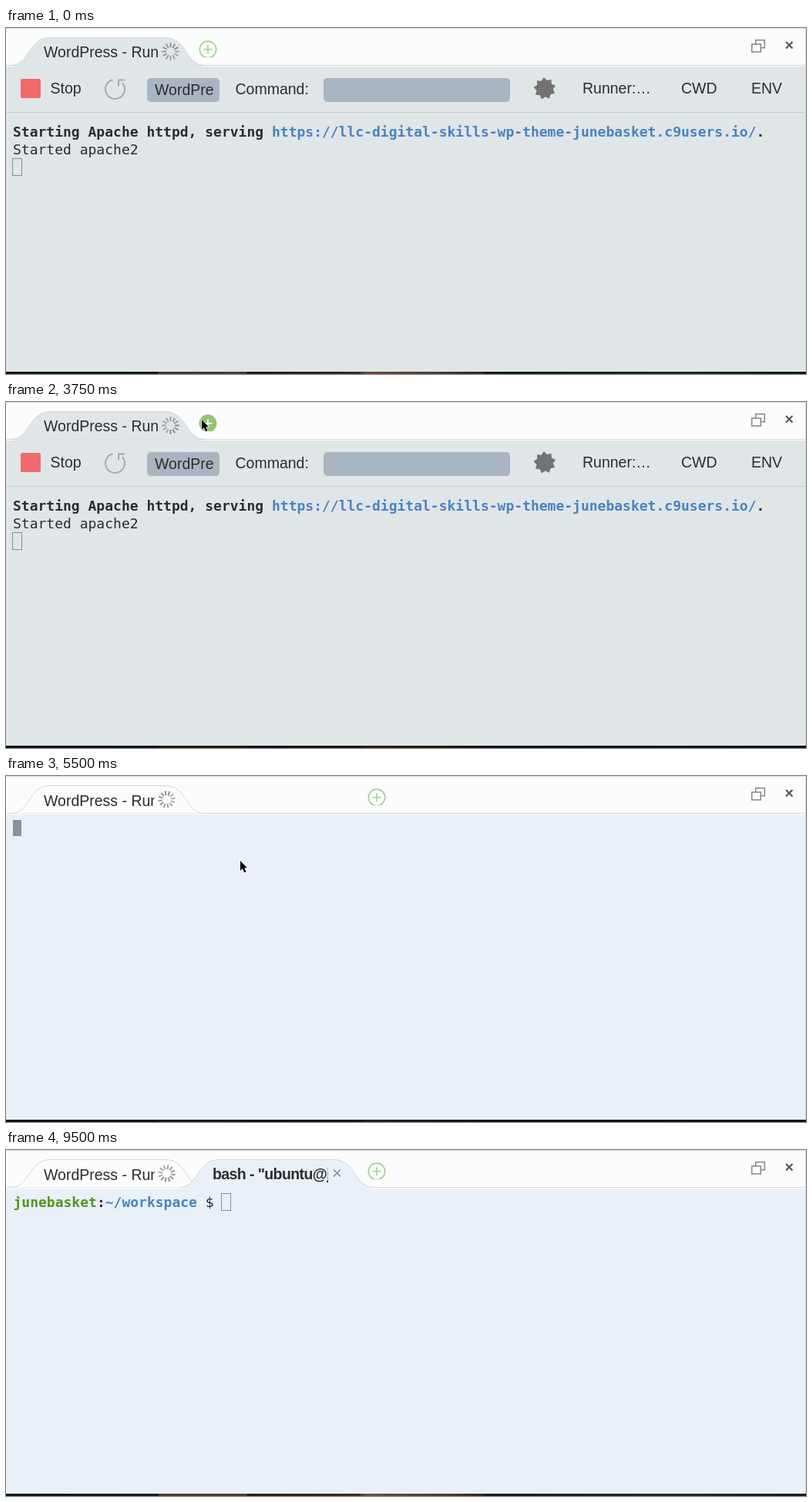
Animation, 1038 px wide and 449 px high, one loop 9750 ms. Source, as an HTML page:

```html
<!DOCTYPE html>
<html lang="en">
<head>
<meta charset="utf-8">
<title>Opening a terminal</title>
<style>
html, body { margin: 0; width: 100%; height: 100%; overflow: hidden; background: #fcfcfc; }
svg { display: block; }
text { font: 19.5px "Liberation Sans", Arial, sans-serif; fill: #2c2c2c; white-space: pre; }
.bold { font-weight: bold; letter-spacing: -.6px; }
.mono text { font: 18px "DejaVu Sans Mono", monospace; }
.mono .b { font-weight: bold; }
#menu text { font-size: 18px; }
#menu .on, #menu .on text { fill: #fff; }
#menu .on path { stroke: #fff; }
.line { fill: none; stroke: #2c2c2c; stroke-width: 1.5; }
.tab { stroke: #d3d6d8; }
</style>
</head>
<body>
<svg width="1038" height="449" viewBox="0 0 1038 449">
  <defs>
    <path id="tab" d="M6 48.5C32 48 28 12.5 58 12.5H206C236 12.5 232 48 258 48.5"/>
    <clipPath id="clipTitle"><rect id="titleBox" width="198" height="48"/></clipPath>
    <clipPath id="clipBash"><rect width="418" height="48"/></clipPath>
    <clipPath id="clipName"><rect x="183" y="65" width="86.5" height="31"/></clipPath>
    <clipPath id="clipPlus"><rect x="-14" y="-14" width="28" height="24.3"/></clipPath>
    <linearGradient id="desk">
      <stop offset="0" stop-color="#10161b"/><stop offset=".19" stop-color="#121a1f"/>
      <stop offset=".191" stop-color="#4d3a2e"/><stop offset=".3" stop-color="#503a2c"/>
      <stop offset=".302" stop-color="#251c19"/><stop offset=".44" stop-color="#3a2a22"/>
      <stop offset=".45" stop-color="#6a4d37"/><stop offset=".55" stop-color="#4c382b"/>
      <stop offset=".597" stop-color="#30251f"/><stop offset=".598" stop-color="#10191d"/>
      <stop offset=".84" stop-color="#1d2b2c"/><stop offset="1" stop-color="#11181c"/>
    </linearGradient>
    <filter id="shadow" x="-5%" y="-5%" width="110%" height="112%">
      <feDropShadow dx="0" dy="2" stdDeviation="3" flood-opacity=".25"/>
    </filter>
  </defs>

  <rect width="1038" height="449" fill="#fcfcfc"/>
  <path d="M0 .5H1038" stroke="#dadada"/>
  <rect id="page" y="50" width="1038" height="396"/>
  <path d="M0 48.5H1038" stroke="#d3d6d8"/>
  <path d="M0 49.5H1038" stroke="#fff"/>

  <use id="tab1" href="#tab" class="tab"/>
  <path id="join" d="M10 48.5H254V50H10Z" fill="#e0e5e8"/>
  <g clip-path="url(#clipTitle)"><text id="title" x="49">WordPress - Run</text></g>
  <g id="spin" stroke="#808386" stroke-width="1.8"></g>

  <g id="tab2">
    <use href="#tab" x="219" class="tab" fill="#e9f0f8"/>
    <path d="M229 48H473V50H229Z" fill="#e9f0f8"/>
    <g clip-path="url(#clipBash)"><text x="268" y="38" class="bold">bash - "ubuntu@junebasket</text></g>
    <path d="M425 25.5l9 9m0-9l-9 9" stroke="#858a8f" stroke-width="1.6"/>
  </g>

  <g id="plus" stroke="#a0cf8c" stroke-width="1.6">
    <circle id="disc" r="10.7" clip-path="url(#clipPlus)"/>
    <path d="M-5.5 0H5.5M0-5.5V5.5"/>
  </g>

  <g fill="#fcfcfc" stroke="#858585" stroke-width="1.5">
    <rect x="972.7" y="15.7" width="11.6" height="10"/>
    <rect x="967.7" y="21" width="11.6" height="10"/>
    <path d="M1012 18l8.5 8.5m0-8.5l-8.5 8.5" stroke="#555" stroke-width="2.1"/>
  </g>

  <g id="runner">
    <path d="M0 109.5H1038" stroke="#c6ccd0"/>
    <rect x="19" y="66" width="26" height="25" rx="2" fill="#f16a6b"/>
    <path d="M138.500 67.300A12.500 12.500 0 1 0 151 71.300M154 67.500H146V75.500" fill="none" stroke="#a6abaf" stroke-width="2"/>
    <g fill="#a9b5c1">
      <rect x="183" y="65" width="94" height="31" rx="5"/>
      <rect x="412" y="65" width="242" height="31" rx="5"/>
    </g>
    <path id="gear" fill="#737373"/>
    <text x="57.500" y="85">Stop</text>
    <g clip-path="url(#clipName)"><text x="193" y="87">WordPress</text></g>
    <text x="297.500" y="86">Command:</text>
    <text x="748" y="85">Runner:…</text>
    <text x="876" y="85">CWD</text>
    <text x="967" y="85">ENV</text>
    <g class="mono">
      <text x="9" y="141" class="b">Starting Apache httpd, serving <tspan fill="#4a83bd">https://llc-digital-skills-wp-theme-junebasket.c9users.io/</tspan>.</text>
      <text x="9" y="164">Started apache2</text>
    </g>
    <rect x="8.500" y="169.500" width="12" height="22" fill="none" stroke="#8b8e90"/>
  </g>

  <g id="prompt" class="mono">
    <text x="9.500" y="74"><tspan class="b" fill="#54961a">junebasket</tspan><tspan class="b">:</tspan><tspan class="b" fill="#4a83bd">~/workspace</tspan> $</text>
  </g>
  <rect id="caret"/>

  <g id="menu">
    <path d="M247 43H970Q975 43 975 48V331Q975 336 970 336H252Q247 336 247 331Z" fill="#fdfdfd" filter="url(#shadow)"/>
    <rect id="bar" x="247" width="728" height="31" fill="#63a9ff"/>
    <g class="row">
      <text x="286" y="76">New File</text><text x="928.500" y="76">N</text>
      <path class="line" d="M911 70l5-7l5 7"/>
    </g>
    <g class="row">
      <text x="286" y="108">New Terminal</text><text x="930.500" y="108">T</text>
      <path class="line" d="M908 96h5l6.500 11h5.500M917 96h8"/>
    </g>
    <g class="row"><text x="286" y="139">New Run Configuration</text></g>
    <g class="row">
      <text x="286" y="171">Open Preferences</text><text x="936" y="171">,</text>
      <text x="914" y="171" style="font-family:'DejaVu Sans',sans-serif;font-size:17px">⌘</text>
    </g>
    <g class="row"><text x="286" y="202">New Immediate Window</text></g>
    <path d="M260 220.500H959" stroke="#e6e6e6"/>
    <text x="286" y="254" style="fill:#999">Recently Closed Tabs</text>
    <text x="299" y="285">Immediate (Javascript (browser))</text>
    <text x="299" y="317">bash - "ubuntu@junebasket-llc-digital-skills-wp-theme-4267004: ~/workspace"</text>
  </g>

  <path d="M1037.500 0V446" stroke="#d5d8da"/>
  <rect y="446" width="1038" height="3" fill="url(#desk)"/>
  <rect id="dim" y="446" width="1038" height="3" fill="#080808" opacity=".65"/>
  <path id="mouse" d="M0 0V12.800L3 10.200L5.200 15.300L7.500 14.300L5.300 9.300H9Z" stroke="#fff" stroke-width="1.200" paint-order="stroke"/>
</svg>
<script>
const $ = id => document.getElementById(id);
const set = (id, attrs) => { for (const a in attrs) $(id).setAttribute(a, attrs[a]); };
const show = (id, on) => set(id, { visibility: on ? 'visible' : 'hidden' });
const STEP = 250, LOOP = 9750;
const MENU = 17, TERM = 22, TAB = 23, PROMPT = 26, BLUR = 37;

// Pointer stops: step, x, y
const stops = [[4, 65, 97], [5, 65, 97], [7, 114, 97], [8, 150, 141], [10, 254, 45], [11, 254, 23],
  [17, 254, 23], [20, 300, 106], [21, 304, 110], [32, 304, 110], [35, 322, 104], [36, 420, 230]];

function pointer(k) {
  const i = stops.findIndex(s => s[0] >= k);
  if (i < 0 || k < stops[0][0]) return null;
  const b = stops[i], a = stops[Math.max(0, i - 1)];
  const f = i ? (k - a[0]) / (b[0] - a[0]) : 1;
  return [a[1] + (b[1] - a[1]) * f, a[2] + (b[2] - a[2]) * f];
}

const polar = (r, a) => `${(r * Math.cos(a)).toFixed(2)} ${(r * Math.sin(a)).toFixed(2)}`;
for (let i = 0; i < 12; i++) {
  const a = i * Math.PI / 6;
  $('spin').innerHTML += `<path d="M${polar(5.5, a)}L${polar(11.3, a)}" opacity="${0.65 + i * 0.03}"/>`;
}
const teeth = Array.from({ length: 18 }, (_, i) => polar(i % 2 ? 10.8 : 14.5, i * Math.PI / 9 - 0.25));
set('gear', { d: `M${teeth.join('L')}Z`, transform: 'translate(699 78.5)' });

const rows = document.querySelectorAll('.row');

function draw(k) {
  const term = k >= TERM, menu = k >= MENU && !term, hover = k >= 11 && !term;
  const pos = pointer(k);

  set('page', { fill: term ? '#e9f0f8' : '#e0e5e8' });
  set('tab1', { fill: term ? '#fcfcfc' : '#e0e5e8' });
  show('join', !term);
  set('title', { y: term ? 39 : 38, class: menu ? 'bold' : '' });
  set('titleBox', { width: term ? 193 : 199 });
  set('spin', { transform: `translate(${term ? 208.5 : 213.5} 30.5) rotate(${k * 80})` });
  set('plus', { transform: `translate(${term ? 481 : 262} 27.8)`, stroke: hover ? '#fff' : '#a0cf8c' });
  set('disc', { fill: hover ? '#93c571' : 'none', stroke: hover ? '#93c571' : '#a0cf8c' });

  show('runner', !term);
  show('tab2', k >= TAB);
  show('prompt', k >= PROMPT);
  show('caret', term);
  const x = k < PROMPT ? 9 : 280, blur = k >= BLUR;
  const blink = [1, 0.5, 0, 0.5][(k + (k < PROMPT ? 3 : 2)) % 4];
  set('caret', blur
    ? { x: x - 0.5, y: 56.5, width: 12, height: 22, fill: 'none', stroke: '#8b8e95', opacity: 1 }
    : { x, y: 57, width: 11, height: 21, fill: '#333', stroke: 'none', opacity: blink });

  show('menu', menu);
  const row = menu && pos ? Math.floor((pos[1] - 53.5) / 31.5) : -1;
  show('bar', row >= 0);
  set('bar', { y: 53.5 + 31.5 * row });
  rows.forEach((r, i) => r.classList.toggle('on', i === row));

  show('dim', k >= 11 && !blur);
  show('mouse', pos);
  if (pos) set('mouse', { transform: `translate(${pos})` });
}

// Colours given on tspans must win over the text rule
document.querySelectorAll('tspan[fill]').forEach(t => t.style.fill = t.getAttribute('fill'));

function tick() {
  draw(Math.floor(performance.now() % LOOP / STEP));
  requestAnimationFrame(tick);
}
tick();
</script>
</body>
</html>
```
